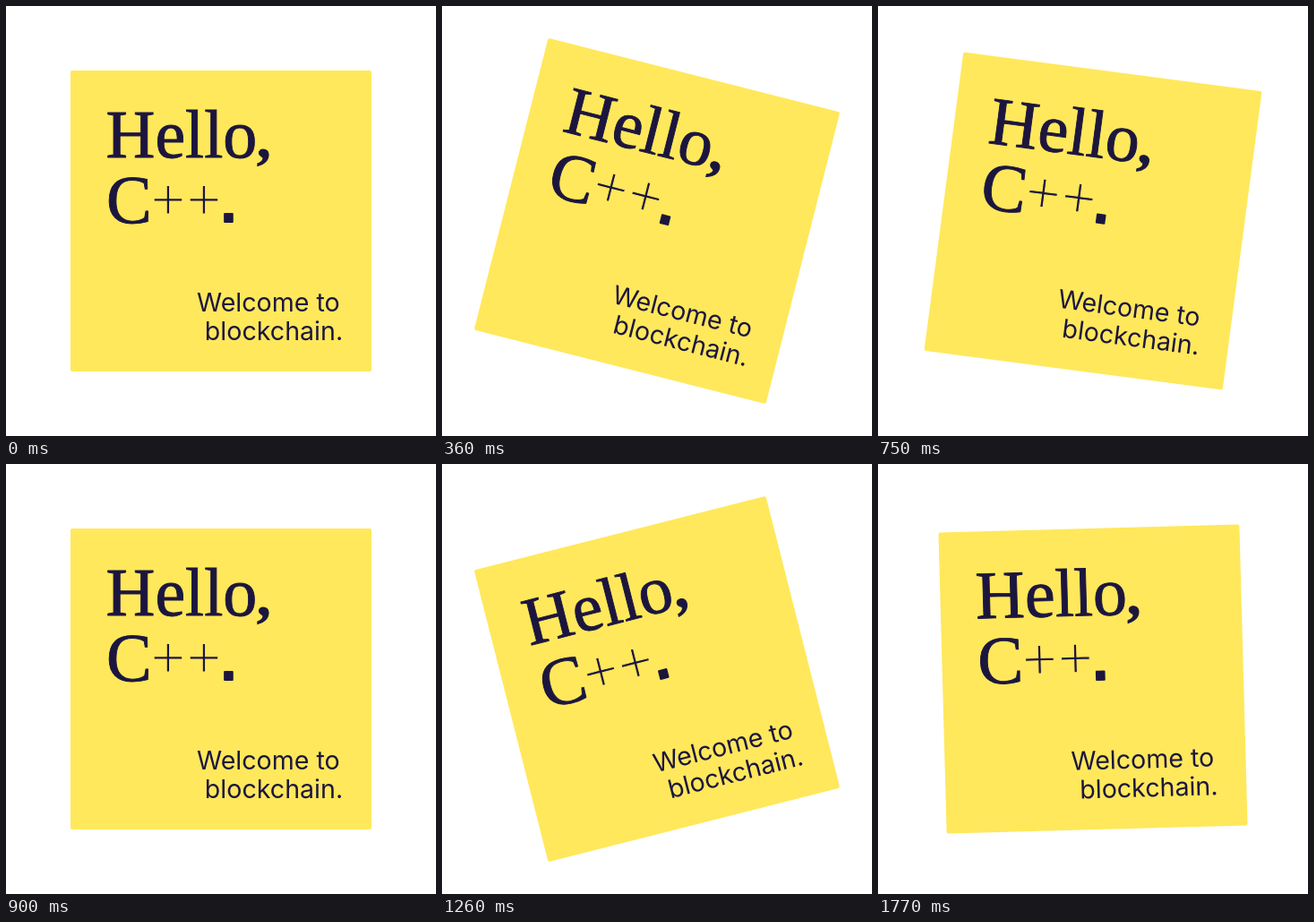
An HTML page for the animation above (1800 ms loop, 480 px wide and 480 px high).

```html
<!DOCTYPE html>
<html lang="en">
<head>
<meta charset="utf-8">
<title>Hello, C++.</title>
<style>
  html, body { margin: 0; height: 100%; overflow: hidden; background: #fff; }
  svg { display: block; width: 100%; height: 100%; }
  text { fill: #1c163f; }
  .title { font: 76px "Liberation Serif", "Times New Roman", serif; stroke: #1c163f; stroke-width: .9; }
  .comma { font-size: 62px; font-weight: bold; }
  /* the card-coloured outline thins the plus signs */
  .plus { font: 68px "Liberation Serif", "Times New Roman", serif; stroke: #ffe85b; stroke-width: 1.1; }
  .dot { font: bold 61px "Liberation Sans", Arial, sans-serif; stroke: #1c163f; stroke-width: 2; stroke-linejoin: round; }
  .note { font: 28.6px Inter, "Liberation Sans", sans-serif; font-optical-sizing: none; text-anchor: middle; }
</style>
</head>
<body>
<svg viewBox="0 0 480 480">
  <g id="card">
    <rect x="72" y="72" width="336" height="336" rx="2" fill="#ffe85b"/>
    <text class="title" x="111.5" y="169">Hello<tspan class="comma" x="280">,</tspan></text>
    <text class="title" x="112" y="242">C</text>
    <text class="plus" y="239"><tspan x="161.8">+</tspan><tspan x="201.8">+</tspan></text>
    <text class="dot" x="240" y="241">.</text>
    <text class="note" x="292.8" y="341">Welcome to</text>
    <text class="note" x="299" y="373">blockchain.</text>
  </g>
</svg>
<script>
  const LOOP = 1800, STEP = 30, SWING = 15;
  const card = document.getElementById("card");
  const start = performance.now();

  function draw() {
    const elapsed = (performance.now() - start) % LOOP;
    const t = Math.floor(elapsed / STEP) * STEP;
    const angle = SWING * Math.sin(2 * Math.PI * t / LOOP);
    card.setAttribute("transform", `rotate(${angle} 240 240)`);
    requestAnimationFrame(draw);
  }
  draw();
</script>
</body>
</html>
```
